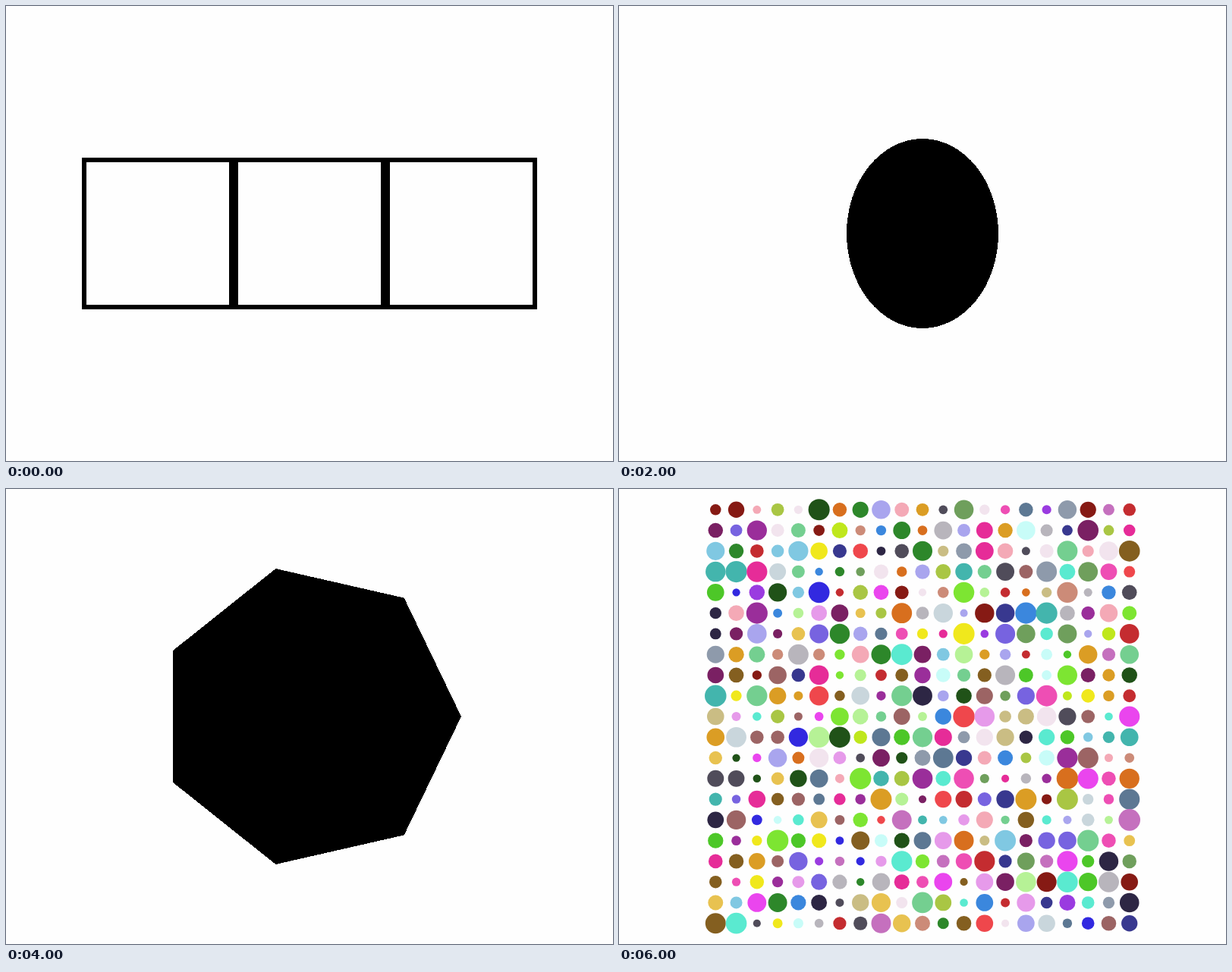
These frames come from a looping animation (800x600 px, 8000 ms). An HTML page:

```html
<!DOCTYPE html>
<html lang="en">
<head>
<meta charset="utf-8">
<title>Shapes</title>
<style>
  html, body { margin: 0; width: 100%; height: 100%; overflow: hidden; background: #fefefe; }
  svg { display: block; width: 100%; height: 100%; }
  .scene { visibility: hidden; }
</style>
</head>
<body>
<svg viewBox="0 0 800 600">
  <g class="scene" fill="none" stroke="#000" stroke-width="6" style="visibility:visible">
    <rect x="103" y="203" width="194" height="194"/>
    <rect x="303" y="203" width="194" height="194"/>
    <rect x="503" y="203" width="194" height="194"/>
  </g>
  <g class="scene" shape-rendering="crispEdges">
    <ellipse cx="400" cy="300" rx="100" ry="125"/>
  </g>
  <g class="scene" shape-rendering="crispEdges">
    <polygon id="heptagon"/>
  </g>
  <g class="scene" id="dots"></g>
</svg>
<script>
const HOLD = 2000;
const COUNT = 21;
const STEP = 600 / (COUNT + 1);
const COLORS = `#3b87dd #845f20 #a9c644 #8e9aab #5d7893 #9c6464 #5aead0 #7763e0 #74cf90
  #80c8e2 #43b5ad #7de532 #38388f #4dc728 #c42c30 #ef474c #6f9f5c #2d2644 #a9a5ee #cc8b78
  #ee4eb4 #db9d24 #bfe71c #205218 #d86f1e #c9d6dc #c570be #9a3be0 #9a2e9a #e8c250 #cabd84
  #f0e81c #7a2063 #504c5a #2d872a #3229e0 #e69aea #e62c98 #f4a9b6 #b8b5bc #ea45ee #861a14
  #b6f296 #c8fcf8 #f2e4ee`.split(/\s+/);

let seed = 7;
function random(min, max) {
  seed = (seed * 1664525 + 1013904223) % 4294967296;
  return min + (max - min) * seed / 4294967296;
}

function regularPolygon(cx, cy, radius, sides) {
  return Array.from({ length: sides }, (_, i) => {
    const angle = i * 2 * Math.PI / sides;
    return [cx + radius * Math.cos(angle), cy + radius * Math.sin(angle)];
  }).join(' ');
}

function dotGrid() {
  let markup = '';
  for (let row = 1; row <= COUNT; row++) {
    for (let col = 1; col <= COUNT; col++) {
      const radius = random(5, 14.3);
      const color = COLORS[Math.floor(random(0, COLORS.length))];
      markup += `<circle cx="${100 + col * STEP}" cy="${row * STEP}" r="${radius}" fill="${color}"/>`;
    }
  }
  return markup;
}

document.getElementById('heptagon').setAttribute('points', regularPolygon(400, 300, 200, 7));
document.getElementById('dots').innerHTML = dotGrid();

const scenes = document.querySelectorAll('.scene');
const start = performance.now();

function draw() {
  const elapsed = performance.now() - start;
  const current = Math.floor(elapsed / HOLD) % scenes.length;
  scenes.forEach((scene, i) => {
    scene.style.visibility = i === current ? 'visible' : 'hidden';
  });
  requestAnimationFrame(draw);
}
draw();
</script>
</body>
</html>
```
